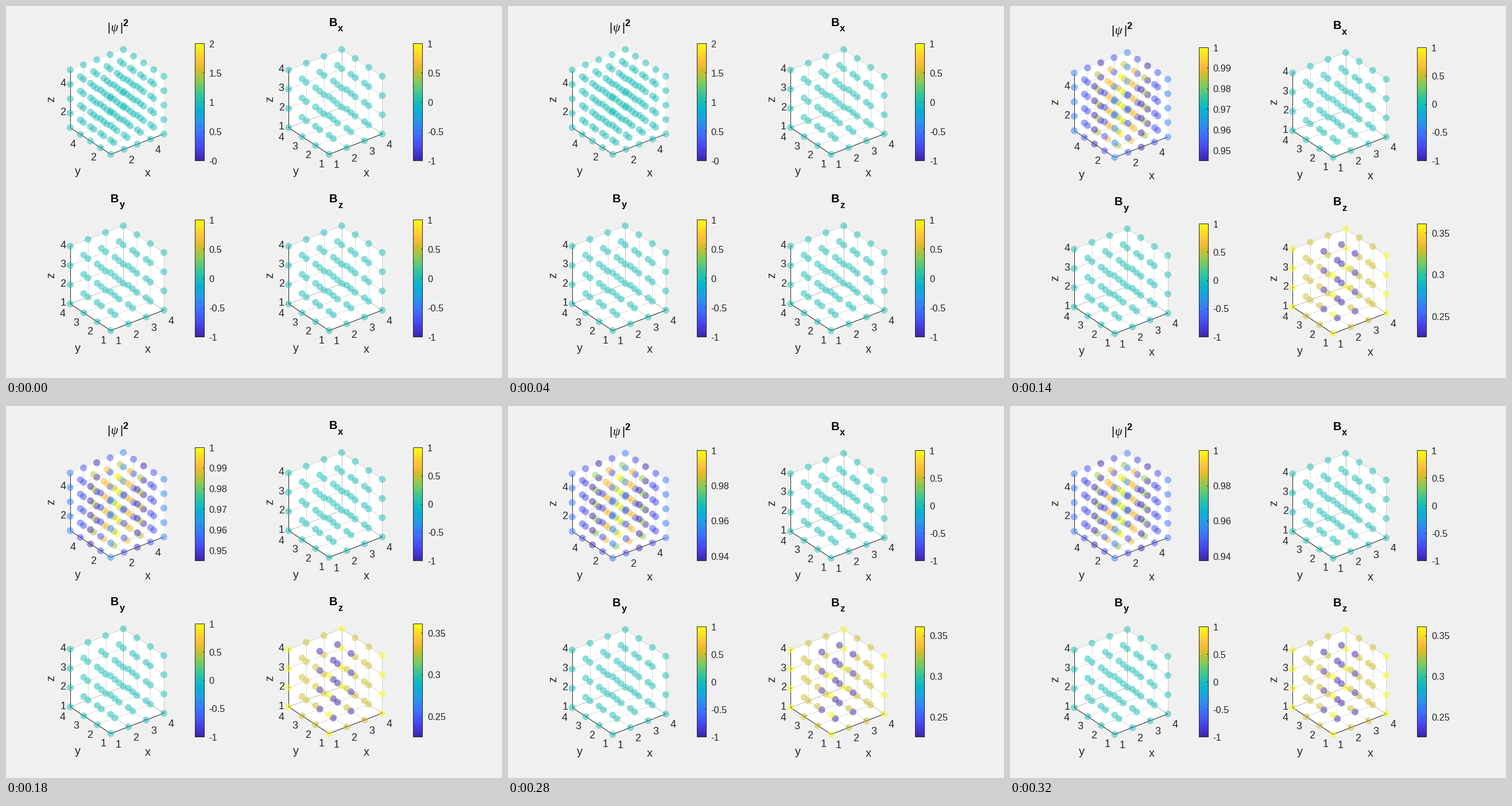
Recreate the animation shown at these times as a matplotlib script. Size 864 by 648 pixels, loop 0.35 s.

```python
import numpy as np
import matplotlib.pyplot as plt
from matplotlib.animation import FuncAnimation
from matplotlib.collections import LineCollection
from matplotlib.colors import LinearSegmentedColormap

W, H = 864, 648
COL, ROW = 380.4, 307
INK = "#262626"
SANS, SERIF = "Liberation Sans", "Liberation Serif"

CMAP = LinearSegmentedColormap.from_list("blue_yellow", [
    (0, "#3e26a8"), (1 / 9, "#4747eb"), (2 / 9, "#3e6fff"), (3 / 9, "#2797eb"),
    (4 / 9, "#08b5d0"), (5 / 9, "#31c69f"), (6 / 9, "#81cc59"),
    (7 / 9, "#dcbd29"), (.84, "#febe3c"), (8 / 9, "#fccf30"), (1, "#f9fb15"),
])

# Screen vectors of the full cube edges
EDGES = np.array([(92.5, -35.5), (-70.5, -46.5), (0, -100.5)])
TOWARD_VIEWER = np.array([-.527, -.687, .5])

fig = plt.figure(figsize=(W / 72, H / 72), dpi=72, facecolor="#f0f0f0")
ax = fig.add_axes([0, 0, 1, 1])


def shift(step):
    """Downward drift of the layout, halving its remaining way each step."""
    return 7 * (1 - .5 ** step)


def bar_top(step):
    """The colorbar shrinks at twice the drift, one step late once started."""
    return 65 + 2 * shift(max(min(step, 1), step - 1))


def density_range(step):
    if step == 0:
        return 0, 2
    return 1 - .0635 * (1 - 1.2 * 3. ** -step), 1


def density_level(x, y, step):
    """Surface dots brighten to the corners, inner ones to the axis."""
    if step == 0:
        return .5
    near, far = sorted((abs(x - 3), abs(y - 3)))
    fade = 3. ** -step
    if far == 2:
        return near * (.12 + .23 * fade)
    return 1 - .18 * far - near * (.14 - .4 * fade)


def z_level(x, y, step):
    """Inner dots are low, faces higher, vertical edges at the top."""
    if step == 0:
        return .5
    return (0, .76, 1)[(x in (1, 4)) + (y in (1, 4))]


def flat_level(x, y, step):
    return .5


def nice_step(span):
    """Smallest 1-2-5 step that cuts the span into fewer than six parts."""
    steps = (m * 10. ** e for e in range(-3, 1) for m in (1, 2, 5))
    return next(s for s in steps if span / s < 6)


def unit(v):
    return v / np.hypot(*v)


def put(x, y, s, size, ha="center", font=SANS, **kw):
    ax.text(x, y, s, fontsize=size, ha=ha, va="baseline", family=font, **kw)


def put_mid(x, y, s, size, **kw):
    put(x, y + .36 * size, s, size, color=INK, **kw)


def lines(segments, color, alpha=1):
    ax.add_collection(LineCollection(segments, colors=color, alpha=alpha,
                                     linewidths=1))


def cube(origin, n, ticks, level, step):
    def at(*p):
        return origin + (np.array(p) - 1) / (n - 1) @ EDGES

    hexagon = [at(1, 1, 1), at(n, 1, 1), at(n, 1, n),
               at(n, n, n), at(1, n, n), at(1, n, 1)]
    ax.fill(*zip(*hexagon), color="white", lw=0)

    ex, ey = unit(EDGES[0]), unit(EDGES[1])
    grid = []
    axes = [(at(1, 1, 1), at(n, 1, 1)), (at(1, 1, 1), at(1, n, 1)),
            (at(1, n, 1), at(1, n, n))]
    for t in ticks:
        grid += [
            (at(t, 1, 1), at(t, n, 1)), (at(t, n, 1), at(t, n, n)),
            (at(1, t, 1), at(n, t, 1)), (at(n, t, 1), at(n, t, n)),
            (at(1, n, t), at(n, n, t)), (at(n, 1, t), at(n, n, t)),
        ]
        for p, inward, offset in ((at(t, 1, 1), 3.5 * ey, (12.8, 17.5)),
                                  (at(1, t, 1), 3.5 * ex, (-12.8, 16)),
                                  (at(1, n, t), 2.5 * ex, (-12.5, -3))):
            axes.append((p, p + inward))
            put_mid(*(p + offset), str(t), 18)
    lines(grid, "black", .15)
    lines(axes, INK)

    r = range(1, n + 1)
    dots = sorted(((x, y, z) for x in r for y in r for z in r),
                  key=lambda p: np.dot(p, TOWARD_VIEWER))
    xy = np.array([at(*p) for p in dots])
    colors = CMAP([level(x, y, step) for x, y, _ in dots])
    colors[:, 3] = .5
    ax.scatter(*xy.T, s=12 ** 2, c=colors, linewidths=0, zorder=3)


def colorbar(left, top, bottom, lo, hi):
    right = left + 16
    ramp = CMAP(np.linspace(1, 0, 256))[:, None, :]
    ax.imshow(ramp, extent=(left, right, bottom, top), aspect="auto",
              interpolation="bilinear", zorder=2)
    ax.add_patch(plt.Rectangle((left, top), 16, bottom - top, fill=False,
                               ec=INK, lw=1, zorder=3))
    gap = nice_step(hi - lo)
    first, last = np.ceil(lo / gap - 1e-6), np.floor(hi / gap + 1e-6)
    for v in gap * np.arange(first, last + 1):
        y = bottom - (v - lo) / (hi - lo) * (bottom - top)
        ax.plot([right - 2, right], [y, y], color=INK, lw=1, zorder=3)
        put_mid(right + 8.5, y + .7, f"{round(v, 4):g}", 16.4, ha="left")


def field_title(x, y, sub):
    put(x + 189, y + 35, "B", 20, weight="bold")
    put(x + 202, y + 44.5, sub, 16.5, weight="bold")


def density_title(x, y):
    for bar in (178.5, 200.5):
        put(x + bar, y + 44, "|", 20)
    put(x + 189.5, y + 44, "ψ", 20, font=SERIF, style="italic")
    put(x + 207.5, y + 35, "2", 16.5, weight="bold")


def panel(x, y, step, name, n, ticks, level, limits):
    top = y + shift(step)
    if name:
        field_title(x, top, name)
    else:
        density_title(x, top)
    cube(np.array([x + 182.4, top + 258.4]), n, ticks, level, step)
    put(x + 247, top + 297, "x", 20, color=INK)
    put(x + 124.5, top + 294.5, "y", 20, color=INK)
    put(x + 84.5, top + 162, "z", 20, color=INK, rotation=90,
        rotation_mode="anchor")
    colorbar(x + 329, y + bar_top(step), y + 269, *limits)


def draw(step):
    ax.clear()
    ax.set_axis_off()
    even, four = (-1, 1), (1, 2, 3, 4)
    z_range = (.2256, .361) if step else even
    panel(0, 0, step, "", 5, (2, 4), density_level, density_range(step))
    panel(COL, 0, step, "x", 4, four, flat_level, even)
    panel(0, ROW, step, "y", 4, four, flat_level, even)
    panel(COL, ROW, step, "z", 4, four, z_level, z_range)
    ax.set_xlim(0, W)
    ax.set_ylim(H, 0)
    return []


anim = FuncAnimation(fig, draw, frames=5, interval=70, repeat=True,
                     repeat_delay=0, init_func=lambda: [])
plt.show()
```
